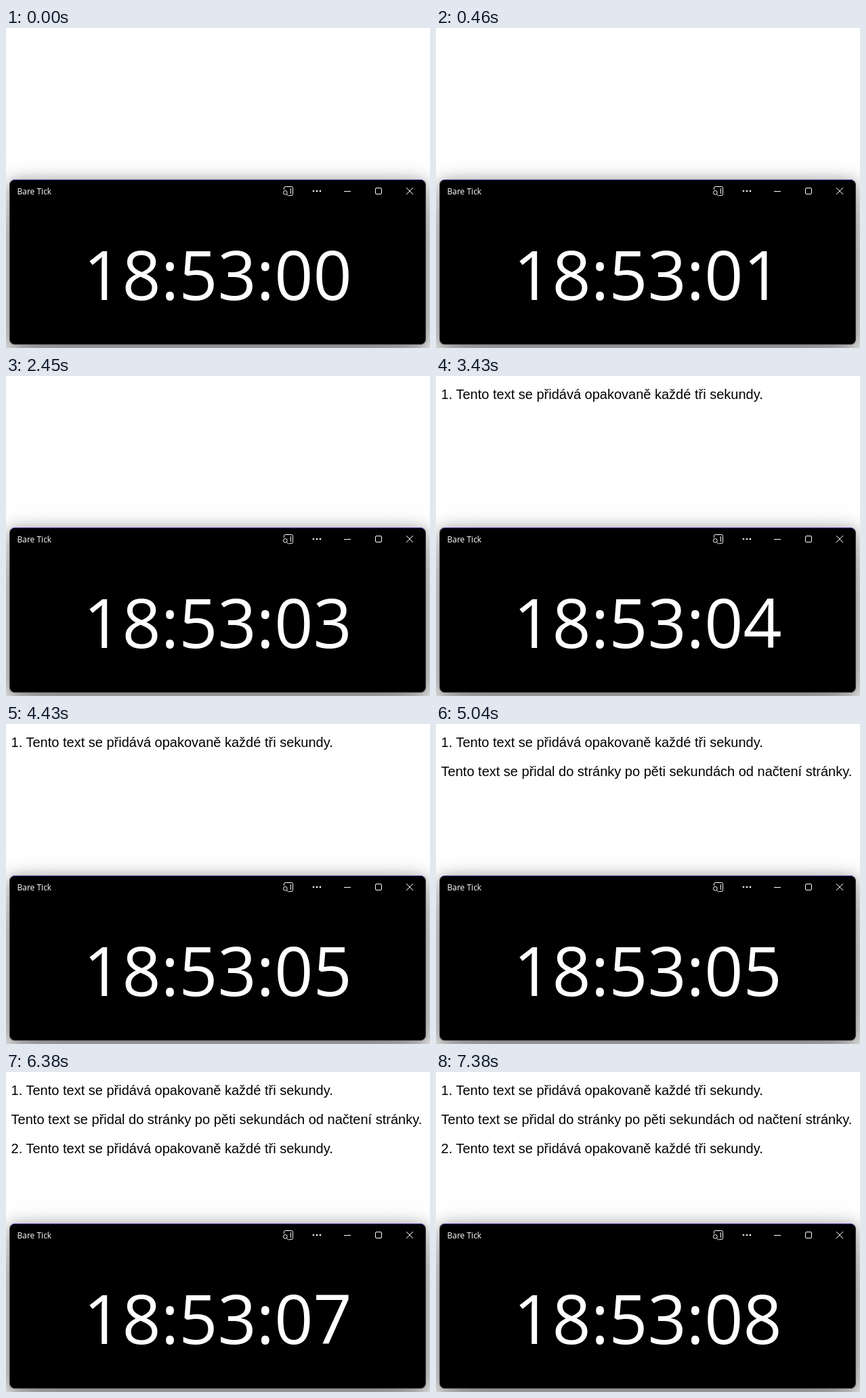
Write an HTML page that moves like this. It is 626x473 px and loops after 8 s.

```html
<!DOCTYPE html>
<html lang="cs">
<head>
<meta charset="utf-8">
<title>Časovače</title>
<style>
  html, body { margin: 0; width: 100%; height: 100%; overflow: hidden; background: #fff; }
  svg { position: absolute; left: 0; top: 0; display: block; }
  .window {
    position: absolute; left: 5px; top: 224px; width: 615px; height: 244px;
    box-sizing: border-box; border-radius: 8px; background: #000;
    border: 1px solid #39363d; border-top-color: #4a1a94;
    box-shadow: 0 32px 64px rgba(0, 0, 0, .37), 0 2px 21px rgba(0, 0, 0, .37);
  }
  .line { font: 20px "Liberation Sans", Arial, sans-serif; fill: #000; }
  .name { font: 12px "Open Sans", "Noto Sans", sans-serif; fill: #fff; }
  .clock { font: 100px "Open Sans", "Noto Sans", sans-serif; fill: #fff; }
  .icons { fill: none; stroke: #fff; stroke-width: 1; }
  .dots { fill: #fff; }
</style>
</head>
<body>
<div class="window"></div>
<svg width="626" height="473" viewBox="0 0 626 473">
  <g class="line">
    <text x="7.6" y="34" data-at="3060">1. Tento text se přidává opakovaně každé tři sekundy.</text>
    <text x="7.6" y="77" data-at="5040">Tento text se přidal do stránky po pěti sekundách od načtení stránky.</text>
    <text x="7.6" y="120" data-at="6050">2. Tento text se přidává opakovaně každé tři sekundy.</text>
  </g>
  <text class="name" x="16.5" y="246">Bare Tick</text>
  <g class="icons">
    <path d="M410.5 239V236.5a2 2 0 0 1 2-2H421.5a2 2 0 0 1 2 2V245.5a2 2 0 0 1-2 2H418M420.5 237V245"/>
    <circle cx="412.3" cy="243.3" r="2.9"/>
    <path d="M414.4 245.4L417.5 248.5M499 241.5H509M591 236L601 246M601 236L591 246"/>
    <rect x="545.5" y="236.5" width="9" height="9" rx="1.5"/>
  </g>
  <g class="dots">
    <circle cx="454" cy="241" r="1.3"/>
    <circle cx="459" cy="241" r="1.3"/>
    <circle cx="464" cy="241" r="1.3"/>
  </g>
  <text class="clock" x="114.3" y="402">18:53:00</text>
</svg>
<script>
  const LOOP = 8000;
  const ticks = [460, 1450, 2450, 3430, 4430, 5410, 6380, 7380];
  const clock = document.querySelector(".clock");
  const lines = document.querySelectorAll("[data-at]");

  function draw() {
    const t = performance.now() % LOOP;
    const time = "18:53:0" + ticks.filter(at => t >= at).length;
    if (clock.textContent !== time) clock.textContent = time;
    for (const line of lines) {
      line.style.visibility = t >= +line.dataset.at ? "visible" : "hidden";
    }
    requestAnimationFrame(draw);
  }
  draw();
</script>
</body>
</html>
```
